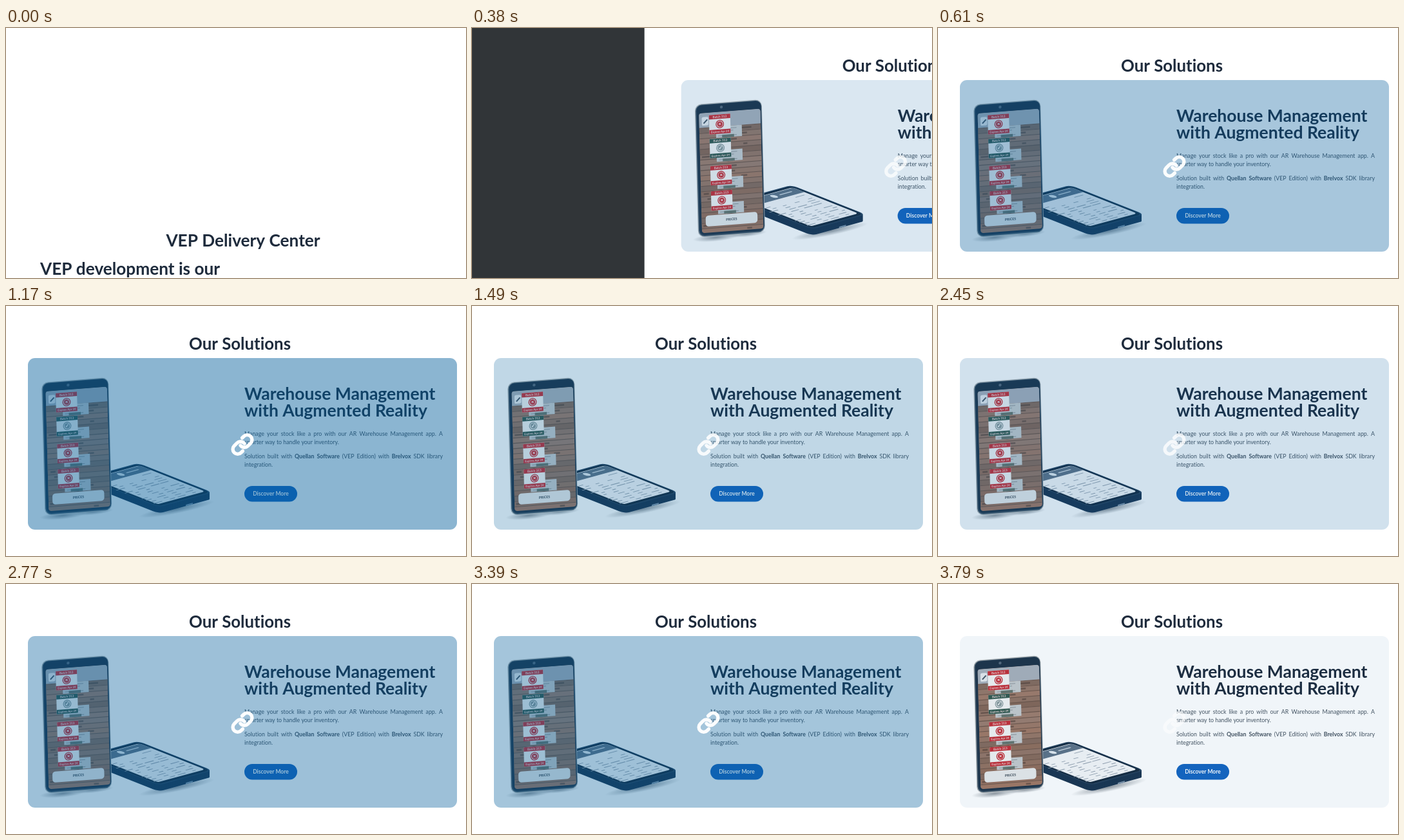
Write an HTML page with a canvas that moves like this. It is 714 px wide and 389 px high and loops after 3880 ms.

```html
<!DOCTYPE html>
<html lang="en">
<head>
<meta charset="utf-8">
<title>Our Solutions</title>
<style>
html, body { margin: 0; width: 100%; height: 100%; overflow: hidden; background: #fff; }
canvas { display: block; }
</style>
</head>
<body>
<canvas id="stage" width="714" height="389"></canvas>
<script>
const ctx = document.getElementById('stage').getContext('2d');
const W = 714, H = 389, LOOP = 3880;
const INK = '#1e2b3c', BODY = '#46525e', RED = '#c52f36', GREEN = '#34594e';
const BOLD = '700', REGULAR = '400';
const LINK = new Path2D('M10 13a5 5 0 0 0 7.54.54l3-3a5 5 0 0 0-7.07-7.07l-1.72 1.71' +
  'M14 11a5 5 0 0 0-7.54-.54l-3 3a5 5 0 0 0 7.07 7.07l1.71-1.71');

const smooth = p => p * p * (3 - 2 * p);

function pulse(t, start, end, peak) {
  return t > start && t < end ? peak * Math.sin(Math.PI * (t - start) / (end - start)) : 0;
}

const tintAt = t => pulse(t, 235, 1745, .49) + pulse(t, 2240, 3860, .45);

function slideAt(t) {
  if (t >= 610) return 0;
  const step = 140 + Math.floor((t - 140) / 80) * 80;
  return 737 * (1 - smooth((step - 74) / 536));
}

function random(seed) {
  return () => (seed = (seed * 16807) % 2147483647) / 2147483647;
}

// Runs a drawing in its own sheared coordinate system.
function within(matrix, paint) {
  ctx.save();
  ctx.transform(...matrix);
  paint();
  ctx.restore();
}

function font(weight, size) {
  ctx.font = `${weight} ${size}px Lato, sans-serif`;
  ctx.letterSpacing = '0.01px'; // keeps ligatures off
}

function text(str, x, y, size, weight = BOLD, color = INK, align = 'left') {
  font(weight, size);
  ctx.fillStyle = color;
  ctx.textAlign = align;
  ctx.fillText(str, x, y);
}

// Words between asterisks are bold; the line is justified to the column.
function justified(line, x, y, width, size) {
  let weight = REGULAR;
  const words = line.split(' ').map(raw => {
    if (raw.startsWith('*')) weight = BOLD;
    const word = { str: raw.replaceAll('*', ''), weight };
    if (raw.endsWith('*')) weight = REGULAR;
    font(word.weight, size);
    word.width = ctx.measureText(word.str).width;
    return word;
  });
  const gap = (width - words.reduce((sum, w) => sum + w.width, 0)) / (words.length - 1);
  for (const w of words) {
    text(w.str, x, y, size, w.weight, BODY);
    x += w.width + gap;
  }
}

function rect(x, y, w, h, color) {
  ctx.fillStyle = color;
  ctx.fillRect(x, y, w, h);
}

function pill(x, y, w, h, r, color) {
  ctx.beginPath();
  ctx.roundRect(x, y, w, h, r);
  ctx.fillStyle = color;
  ctx.fill();
}

function disc(x, y, r, color) {
  ctx.beginPath();
  ctx.arc(x, y, r, 0, Math.PI * 2);
  ctx.fillStyle = color;
  ctx.fill();
}

function shadow(x, y, rx, ry, angle) {
  ctx.save();
  ctx.translate(x, y);
  ctx.rotate(angle);
  ctx.scale(rx, ry);
  const glow = ctx.createRadialGradient(0, 0, 0, 0, 0, 1);
  glow.addColorStop(0, 'rgba(60,70,80,.55)');
  glow.addColorStop(1, 'rgba(60,70,80,0)');
  disc(0, 0, 1, glow);
  ctx.restore();
}

// Local space is 100 long by 100 wide; x runs toward the viewer.
function lyingPhone() {
  shadow(265, 316, 60, 7, -.2);
  const rnd = random(41);
  for (let depth = 10; depth >= 0; depth--) {
    within([1.01, .4, -.73, .2, 207, 248 + depth], () =>
      pill(-6, -6, 114, 114, 9, depth ? '#1c3550' : '#2a4560'));
  }
  within([1.01, .4, -.73, .2, 207, 248], () => {
    pill(-4, -4, 110, 110, 8, '#162a3f');
    pill(0, 0, 101, 101, 5, '#f5f6f8');
    rect(1, 0, 17, 101, '#5f7387');
    disc(9, 52, 5, '#e4ebf0');
    rect(8, 14, 2, 26, '#d5dee6');
    for (let x = 24; x < 98; x += 6) {
      for (let y = 6; y < 90; y += 26) {
        if (rnd() < .75) rect(x, y + rnd() * 8, 1.5, 6 + rnd() * 13, '#9aa5b1');
      }
    }
  });
  within([1, -.27, 0, 1, 279, 309], () => pill(0, 0, 11, 2.6, 1.3, '#7d93a8'));
}

function paperLabel(x, y) {
  rect(x, y, 39, 17, '#c6cacc');
  for (let k = 0; k < 4; k++) rect(x + 3, y + 3 + k * 3.6, 28 - k % 3 * 5, 1, '#8f969b');
  rect(x + 9, y + 13, 18, 4, '#66756d');
}

function tag(x, y, valid) {
  const accent = valid ? GREEN : RED, mark = valid ? '#8b9b9d' : RED;
  rect(x, y, 32, 29, '#f3f3f2');
  rect(x, y, 32, 6.5, accent);
  rect(x, y + 22.5, 32, 6.5, accent);
  text('Batch 313', x + 16, y + 4.9, 4.6, BOLD, '#f0d9d8', 'center');
  text('Expires Apr 24', x + 16, y + 27.3, 4.2, BOLD, '#f0d9d8', 'center');
  disc(x + 16, y + 14.5, 6.3, mark);
  disc(x + 16, y + 14.5, 5, '#f3f3f2');
  disc(x + 16, y + 14.5, 4.1, mark);
  text(valid ? '✓' : '×', x + 16, y + 17, 8, BOLD, '#fff', 'center');
}

function wood() {
  const rnd = random(17);
  rect(5, 14, 94, 180, '#967462');
  for (let y = 36; y < 194; y += 8) {
    rect(5, y, 94, 8, `hsl(20 ${18 + rnd() * 8}% ${42 + rnd() * 11}%)`);
    rect(5, y, 94, 1, '#6f5649');
    rect(8 + rnd() * 70, y + 3, 6 + rnd() * 14, 2.5, 'rgba(70,52,44,.5)');
  }
}

// Local space is 100 by 200, from the top left corner of the case.
function standingPhone() {
  shadow(88, 326, 36, 6, -.1);
  shadow(135, 320, 32, 5, -.1);
  within([1.03, -.08, .027, 1.03, 55, 119], () => {
    pill(0, 0, 101, 201, 10, '#b3b5b5');
    pill(1.2, 1.2, 99, 198.5, 9, '#3c5062');
    pill(2.6, 2, 97, 196, 8, '#1f3347');
    disc(40, 7, 2.2, '#56687a');
    ctx.save();
    ctx.beginPath();
    ctx.roundRect(6, 14, 92.5, 181, 4);
    ctx.clip();
    wood();
    rect(5, 14, 94, 22, '#a9b0ba');
    pill(10, 20, 10, 13, 2, '#e6e9ec');
    within([.7, -.7, .7, .7, 12, 29], () => rect(0, 0, 8, 2, '#465563'));
    for (const y of [18, 54, 95, 133]) {
      paperLabel(31, y + 18);
      tag(21, y, y === 54);
    }
    ctx.restore();
    pill(12, 169, 78, 16.5, 4.5, '#e9eaea');
    text('PRICES', 51, 179, 5, BOLD, '#36424d', 'center');
  });
}

function linkIcon(alpha) {
  ctx.save();
  ctx.globalAlpha = alpha;
  ctx.translate(349, 197.5);
  ctx.scale(1.5, 1.5);
  ctx.strokeStyle = '#fff';
  ctx.lineWidth = 3.6;
  ctx.lineCap = 'round';
  ctx.stroke(LINK);
  ctx.restore();
}

function solutions(tint) {
  rect(-23, 0, W + 60, H, '#fff');
  text('Our Solutions', 363, 68, 25.8, BOLD, INK, 'center');
  lyingPhone();
  standingPhone();
  text('Warehouse Management', 370, 146, 26.5);
  text('with Augmented Reality', 370, 172, 26.5);
  justified('Manage your stock like a pro with our AR Warehouse Management app. A', 370, 202, 308, 8.8);
  text('smarter way to handle your inventory.', 370, 215, 8.8, REGULAR, BODY);
  justified('Solution built with *Quellan Software* (VEP Edition) with *Brelvox* SDK library', 370, 237, 308, 8.8);
  text('integration.', 370, 250, 8.8, REGULAR, BODY);
  pill(370, 280, 82, 24.5, 12.2, '#1565c0');
  text('Discover More', 411, 295, 8.5, BOLD, '#fff', 'center');
  if (tint > 0) {
    pill(34, 81, 666, 267, 11, `rgba(0,92,155,${tint})`);
    linkIcon(Math.min(1, Math.pow(tint / .4, .3)));
  }
}

function intro() {
  rect(0, 0, W, H, '#fff');
  text('VEP Delivery Center', 368, 340, 26.2, BOLD, INK, 'center');
  text('VEP development is our', 53, 384, 26.2);
}

function draw(t) {
  if (t < 140) return intro();
  rect(0, 0, W, H, '#313538');
  ctx.save();
  ctx.translate(slideAt(t), 0);
  solutions(tintAt(t));
  ctx.restore();
}

const start = performance.now();
function tick() {
  draw((performance.now() - start) % LOOP);
  requestAnimationFrame(tick);
}
tick();
</script>
</body>
</html>
```
